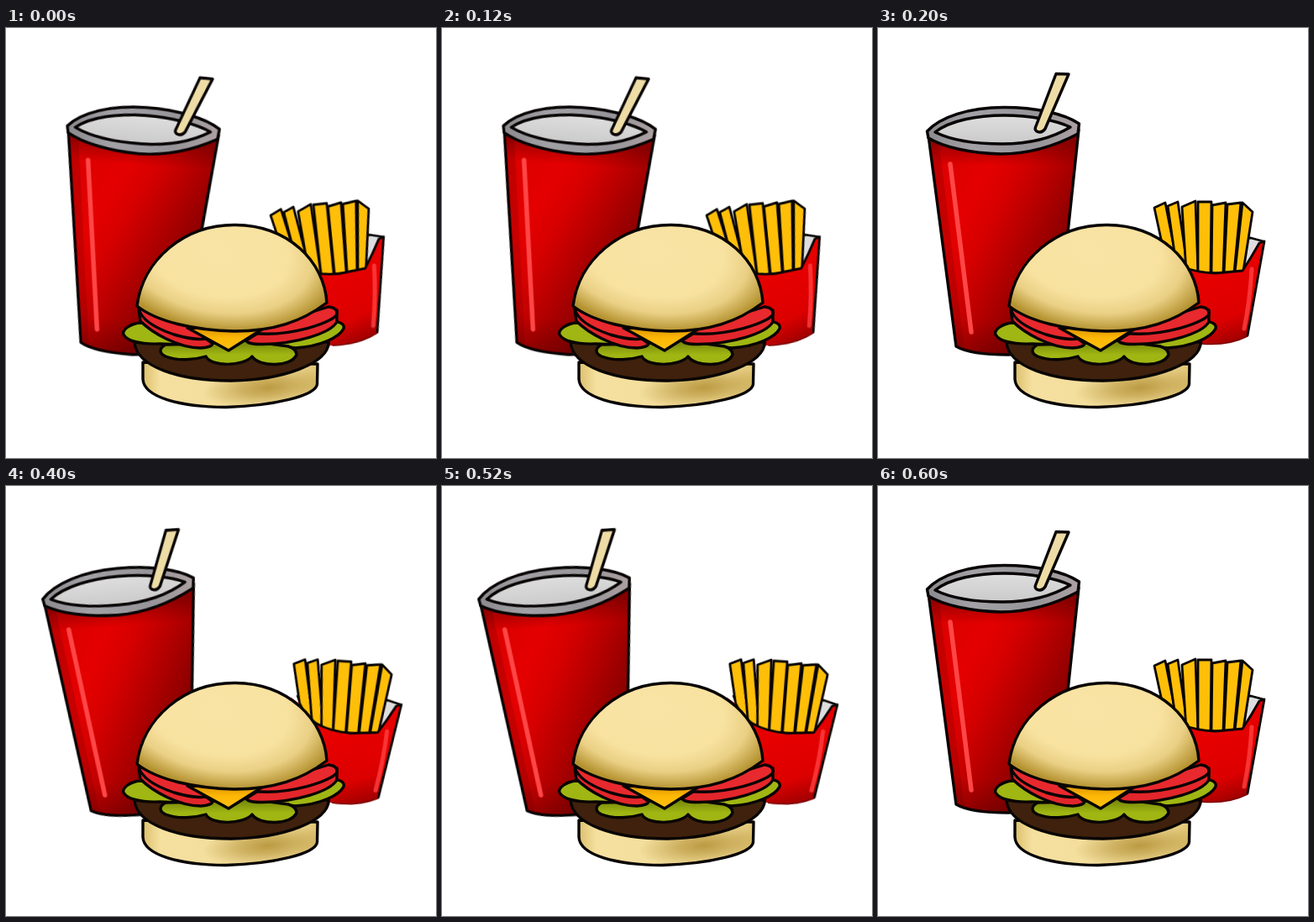
These frames come from a looping animation (512 by 512 pixels, 0.8 s). An HTML page:

```html
<!DOCTYPE html>
<html lang="en">
<head>
<meta charset="utf-8">
<title>Fast food</title>
<style>
  html, body { margin: 0; width: 100%; height: 100%; overflow: hidden; background: #fff; }
  svg { display: block; width: 100vw; height: 100vh; }
  .ink { stroke: #080404; stroke-width: 3.4; stroke-linejoin: round; stroke-linecap: round; }
  .thin { stroke-width: 2.8; }
  #cup, #fries { transform-box: view-box; transform-origin: 0 0; }
</style>
</head>
<body>
<svg viewBox="0 0 512 512">
  <defs>
    <linearGradient id="red" gradientUnits="userSpaceOnUse" x1="70" y1="210" x2="225" y2="290">
      <stop offset="0" stop-color="#de0000"/>
      <stop offset=".2" stop-color="#e40000"/>
      <stop offset=".38" stop-color="#d60000"/>
      <stop offset=".6" stop-color="#b60000"/>
      <stop offset=".8" stop-color="#960000"/>
      <stop offset="1" stop-color="#7a0000"/>
    </linearGradient>
    <linearGradient id="low" x1="0" y1="0" x2="0" y2="1">
      <stop offset=".06" stop-color="#400" stop-opacity=".4"/>
      <stop offset=".16" stop-color="#400" stop-opacity="0"/>
      <stop offset=".85" stop-color="#400" stop-opacity="0"/>
      <stop offset="1" stop-color="#400" stop-opacity=".3"/>
    </linearGradient>
    <linearGradient id="rim">
      <stop offset="0" stop-color="#8b8a8e"/>
      <stop offset=".3" stop-color="#a2a1a5"/>
      <stop offset=".7" stop-color="#969599"/>
      <stop offset="1" stop-color="#aca0a2"/>
    </linearGradient>
    <linearGradient id="lid" x1="0" y1="0" x2="0" y2="1">
      <stop offset="0" stop-color="#dedede"/>
      <stop offset="1" stop-color="#cacaca"/>
    </linearGradient>
    <linearGradient id="box" gradientUnits="userSpaceOnUse" x1="395" y1="300" x2="424" y2="378">
      <stop offset="0" stop-color="#e60000"/>
      <stop offset=".6" stop-color="#dc0000"/>
      <stop offset="1" stop-color="#980000"/>
    </linearGradient>
    <radialGradient id="dome" gradientUnits="userSpaceOnUse" cx="0" cy="0" r="1"
        gradientTransform="translate(252 266) rotate(10) scale(146 93)">
      <stop offset="0" stop-color="#f9e4a6"/>
      <stop offset=".58" stop-color="#f8e2a0"/>
      <stop offset=".78" stop-color="#ead085"/>
      <stop offset="1" stop-color="#b4922f"/>
    </radialGradient>
    <linearGradient id="heel">
      <stop offset="0" stop-color="#dcc06c"/>
      <stop offset=".1" stop-color="#f5e0a0"/>
      <stop offset=".85" stop-color="#f2dc98"/>
      <stop offset="1" stop-color="#dfc474"/>
    </linearGradient>
    <radialGradient id="heelShade" gradientUnits="userSpaceOnUse" cx="0" cy="0" r="1"
        gradientTransform="translate(312 428) rotate(-5) scale(78 24)">
      <stop offset="0" stop-color="#a98526" stop-opacity=".75"/>
      <stop offset=".4" stop-color="#a98526" stop-opacity=".5"/>
      <stop offset="1" stop-color="#a98526" stop-opacity="0"/>
    </radialGradient>
    <linearGradient id="cheese" x1="0" y1="0" x2="0" y2="1">
      <stop offset="0" stop-color="#d99200"/>
      <stop offset=".45" stop-color="#fdb806"/>
      <stop offset="1" stop-color="#ffc010"/>
    </linearGradient>
    <linearGradient id="leaf" x1="0" y1="0" x2="0" y2="1">
      <stop offset="0" stop-color="#6f8008"/>
      <stop offset=".6" stop-color="#a0b612"/>
    </linearGradient>
  </defs>

  <g id="cup">
    <path class="ink" fill="url(#red)" d="M60 128 L93 379 Q110 389 155 389 Q195 387 212 376 L239 121 Z"/>
    <path fill="#500" opacity=".2" d="M62 132 L73 140 L103 384 L94 379 Z"/>
    <path fill="url(#low)" d="M62 128 L95 378 Q110 388 155 388 Q195 386 211 376 L238 121 Z"/>
    <path d="M86 162 L111 362" fill="none" stroke="#ff4646" stroke-width="5.5" stroke-linecap="round"/>
    <path class="ink" fill="url(#rim)" d="M58.500 123 C74 106 108 94.500 150 94.500 C188 94.500 222 102 239.500 114 L238 126 C206 143 174 150 146 150 C110 149 78 142 60 131 Z"/>
    <path class="ink" fill="url(#lid)" d="M68 124 C86 110 118 104 150 104 C182 104 212 110 229 118 C206 132 178 138 148 138 C114 138 86 133 68 124 Z"/>
    <path class="ink" fill="#eedcA6" d="M212 54.500 L227 55 L199 120 Q195 126 189 123 Q186 121 188 117 Z"/>
  </g>

  <g id="fries">
    <path class="ink thin" fill="#dedede" d="M336 252 L444 250 L459 254 L436 289 L352 286 Z"/>
    <g id="sticks" class="ink thin" fill="#ffbf08"></g>
    <path class="ink thin" fill="url(#box)" stroke="none" style="stroke: none"
      d="M328 254 L340 262 Q352 290 402 292 L434 289 Q444 274 454 256 L460 254 L440 367 Q416 379 385 376 L348 372 Z"/>
    <path class="ink thin" fill="none" d="M340 262 Q352 290 402 292 L434 289 Q444 274 454 256 L460 254 L440 366"/>
    <path d="M440 367 Q416 379 385 376" fill="none" stroke="#7c0000" stroke-width="1.5"/>
    <path d="M445 287 Q443 324 436 358" fill="none" stroke="#ff4040" stroke-width="5" stroke-linecap="round" opacity=".8"/>
  </g>

  <g class="ink">
    <path fill="url(#heel)" d="M163 398 L163 418 C164 440 208 451 262 451.500 C318 450 369 438 370.500 424 L371 400 Z"/>
    <path fill="url(#heelShade)" stroke="none" d="M165 398 L165 418 C166 439 208 449 262 450 C318 448 367 436 369 424 L369 400 Z"/>
    <path fill="#3f210d" d="M153 374 C155 403 205 420 268 420 C330 419 383 400 384.500 374 Z"/>
    <path fill="#a0b612" d="M160 351 C147 352 138 360 140 365 C144 372 158 377 183 376 L230 378 L200 354 Z"/>
    <path fill="#a0b612" d="M385 350 C395 348 404 352 402 358 C397 368 375 379 345 381 L295 376 Z"/>
    <path fill="url(#leaf)" d="M190 377 C181 382 183 388 190 391 C205 397 225 395 238 391 C244 404 283 403 293 391 C301 404 340 404 346 389 Q346 382 336 379 L285 372 L238 376 Z"/>
    <path fill="#e3262b" d="M158 335 L160 349 C174 363 205 381 232 381 Q245 380 246 376 L222 358 Z"/>
    <path fill="#e8292e" d="M158 334 Q162 352 200 365 Q224 372 238 370 L222 356 Z"/>
    <path fill="#e3262b" d="M286 372 Q288 377 306 376.500 C344 376 386 364 394 350 L394 336 L310 357 Z"/>
    <path fill="#e8292e" d="M292 363 C338 369 390 350 394 341 Q395 333 384 332 L300 358 Z"/>
    <path fill="url(#cheese)" d="M216 357 L265 384 L306 358 Z"/>
    <path fill="url(#dome)" d="M156 331 C163 276 212 234 273 234.500 C336 235 379 278 382 327 C352 350 318 361 272 361 C225 360 180 350 156 331 Z"/>
  </g>
</svg>
<script>
  // Each stick: top left, top right, bottom right, bottom left.
  const sticks = [
    [329, 214, 342, 208, 357, 284, 344, 284],
    [345, 212, 357, 207, 369, 288, 356, 288],
    [362, 213, 378, 206, 381, 291, 367, 290],
    [381, 207, 397, 207, 396, 292, 381, 292],
    [398, 211, 414, 208, 411, 292, 397, 292],
    [416, 210, 432, 208, 424, 291, 412, 292],
    [434, 208, 446, 219, 435, 289, 425, 291]
  ];
  const NS = "http://www.w3.org/2000/svg";
  for (const points of sticks) {
    const stick = document.createElementNS(NS, "polygon");
    stick.setAttribute("points", points.join(" "));
    document.getElementById("sticks").append(stick);
  }

  // A turn by deg around (x, y).
  const turn = (deg, x, y) =>
    `translate(${x}px, ${y}px) rotate(${deg}deg) translate(${-x}px, ${-y}px)`;

  function rock(id, right, left) {
    const rest = turn(0, 0, 0);
    const poses = [right, rest, left, rest, right];
    document.getElementById(id).animate(
      poses.map((transform, i) => ({ transform, offset: i / 4, easing: "steps(1, end)" })),
      { duration: 800, iterations: Infinity }
    ).startTime = 0;
  }

  rock("cup", turn(4.1, 156, 323), turn(-5.2, 181, 291));
  rock("fries", turn(-6.3, 405, 345), turn(3.8, 370, 420));
</script>
</body>
</html>
```
